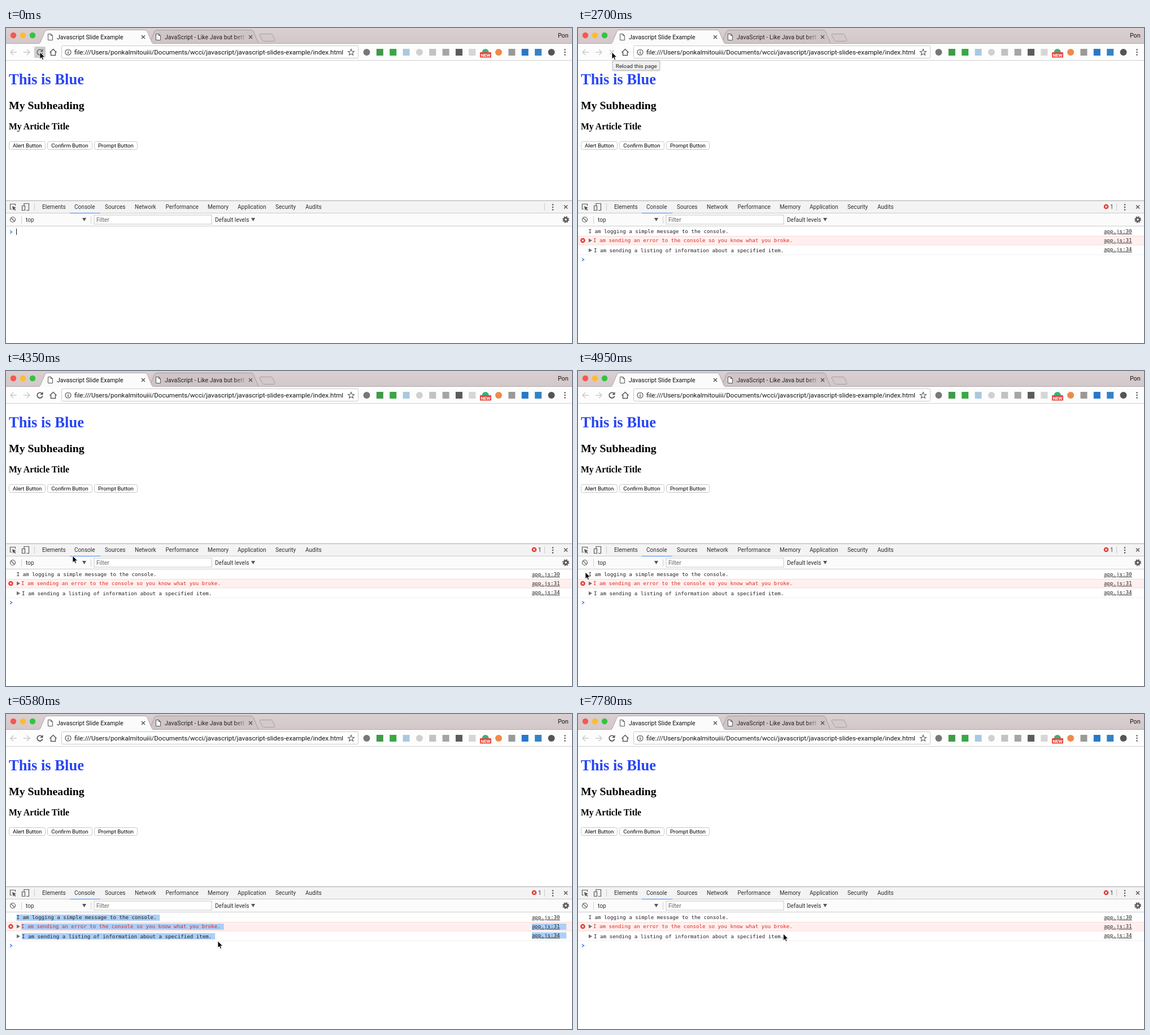
These frames come from a looping animation (1002 by 559 pixels, 8000 ms). An HTML page:

```html
<!DOCTYPE html>
<html lang="en">
<head>
<meta charset="utf-8">
<title>Browser console demo</title>
<style>
  html, body { margin: 0; width: 100%; height: 100%; overflow: hidden; background: #fff; }
  svg { display: block; width: 1002px; height: 559px; font: 10.1px Roboto, sans-serif; fill: #303030; }
  text { white-space: pre; }
  .line { fill: none; stroke: #5a5a5a; stroke-width: 1.5; }
  .rule { stroke: #ccc; }
  .page { font-family: "Liberation Serif", serif; font-weight: bold; fill: #000; }
  .box { fill: #fff; stroke: #c8c8c8; }
  .tab { font-size: 10.6px; fill: #111; }
  .mono { font: 9.17px "DejaVu Sans Mono", monospace; fill: #222; }
  .link { text-decoration: underline; }
  .small { font-size: 9.7px; fill: #000; }
  .tip rect { fill: #f1f1f1; stroke: #c3c3c3; filter: drop-shadow(0 1px 1px #0004); }
  .tip text { font-size: 9.9px; fill: #222; }
</style>
</head>
<body>
<svg viewBox="0 0 1002 559">
  <defs>
    <linearGradient id="strip" x2="0" y2="1"><stop stop-color="#dacfd1"/><stop offset="1" stop-color="#d2c7c9"/></linearGradient>
    <linearGradient id="fade" gradientUnits="userSpaceOnUse" x1="404" x2="428"><stop stop-color="#222"/><stop offset="1" stop-color="#222" stop-opacity="0"/></linearGradient>
    <path id="doc" d="M.5.5h5l3 3v8h-8zM5.5.5v3h3" fill="#fff" stroke="#555"/>
    <path id="close" d="M-3-3 3 3M3-3-3 3" class="line"/>
    <g id="reload"><path d="M3.5-3.3A4.8 4.8 0 1 0 4.7 1.2" fill="none" stroke-width="1.7"/><path d="M5.5-6v5.3H.2z" stroke="none"/></g>
    <path id="caret" d="M0 0h7l-3.5 6z" fill="#555"/>
    <path id="prompt" d="M-2-2.5 1.5 0-2 2.5" fill="none" stroke="#3b78e7" stroke-width="1.4"/>
    <g id="dots"><circle cy="-4.5" r="1.3"/><circle r="1.3"/><circle cy="4.5" r="1.3"/></g>
    <g id="error"><circle r="4.3" fill="#df3a32"/><path d="M-1.6-1.6 1.6 1.6M1.6-1.6-1.6 1.6" stroke="#fff" stroke-width="1.2"/></g>
  </defs>

  <!-- tab strip -->
  <rect width="1002" height="28" fill="url(#strip)"/>
  <path d="M254 27.5 263 6q1-2.5 4-2.5H434q3 0 4 2.5L447 27.5z" fill="#cfc5c7" stroke="#a79fa1"/>
  <path d="M451 10.5h18q2 0 3 2l4 9q0 2-2 2H457q-2 0-3-2l-5-9q0-2 2-2z" fill="#d3c9cb" stroke="#a79fa1"/>
  <path d="M0 27.5H1002" stroke="#b1a8aa"/>
  <path d="M57 28.5Q60 27.5 61 25L69 6q1-2.5 4-2.5H246q3 0 4 2.5L258 25q1 2.5 4 3.5z" fill="#fbfbfb" stroke="#b1a8aa"/>
  <circle cx="13" cy="13" r="5.2" fill="#f9564f"/><circle cx="30" cy="13" r="5.2" fill="#fdbc2e"/><circle cx="47" cy="13" r="5.2" fill="#31c541"/>
  <use href="#doc" x="74" y="10"/><use href="#doc" x="265" y="10"/>
  <text class="tab" x="90" y="19.5">Javascript Slide Example</text>
  <text class="tab" x="281" y="19.5" style="fill:url(#fade)">JavaScript - Like Java but bett</text>
  <use href="#close" x="243" y="16"/><use href="#close" x="433" y="16"/>
  <text class="tab" x="977" y="17">Pon</text>

  <!-- toolbar -->
  <rect y="28" width="1002" height="30" fill="#fdfdfd"/>
  <path d="M0 57.5H1002" stroke="#d0d0d0"/>
  <g class="line">
    <path d="M19 43H8m5-5-5 5 5 5M31 43H42m-5-5 5 5-5 5" stroke="#ccc"/>
    <path d="M77.5 43.5 83.5 37.5 89.5 43.5M79.5 42.5V48.5H87.5V42.5"/>
  </g>
  <rect data-at="0-2550" x="50" y="33" width="20" height="20" rx="2" fill="#cdcdcd"/>
  <use data-at="0-2550" href="#reload" x="60" y="43" fill="#707070" stroke="#707070"/>
  <path data-at="2550-3900" d="M56 39l8 8m0-8-8 8" stroke="#c8c8c8" stroke-width="1.7"/>
  <use data-at="3900-4200" href="#reload" x="60" y="43" fill="#c8c8c8" stroke="#c8c8c8"/>
  <use data-at="4200-8000" href="#reload" x="60" y="43" fill="#555" stroke="#555"/>
  <rect class="box" x="98.5" y="31.5" width="525" height="22" rx="2"/>
  <circle class="line" cx="110" cy="43" r="5" style="stroke-width:1.2"/>
  <path d="M110 42v4m0-6.5v1.5" class="line"/>
  <text x="121" y="46.8" style="font-size:11.55px;fill:#111">file:///Users/ponkalmitouiii/Documents/wcci/javascript/javascript-slides-example/index.html</text>
  <path d="M611 37.5l1.5 3.7 4 .3-3 2.6 1 3.9-3.5-2.1-3.5 2.1 1-3.9-3-2.6 4-.3z" class="line" style="stroke-width:1.1"/>
  <g id="extensions"></g>
  <rect x="839" y="43" width="20" height="9.5" rx="1" fill="#e5483c"/>
  <text x="849" y="51" text-anchor="middle" style="font-size:8px;font-weight:bold;fill:#fff">NEW</text>
  <use href="#dots" x="989.5" y="43" fill="#555"/>

  <!-- page -->
  <g class="page">
    <text x="5" y="100" style="font-size:26.6px;fill:#2845f5">This is Blue</text>
    <text x="5" y="143.5" style="font-size:19.8px">My Subheading</text>
    <text x="5" y="179.5" style="font-size:15.75px">My Article Title</text>
  </g>
  <g class="box">
    <rect x="5.5" y="201.5" width="64" height="14" rx="3"/>
    <rect x="73.5" y="201.5" width="79" height="14" rx="3"/>
    <rect x="156.5" y="201.5" width="76" height="14" rx="3"/>
  </g>
  <g class="small">
    <text x="12" y="211.7">Alert Button</text><text x="80.3" y="211.7">Confirm Button</text><text x="163" y="211.7">Prompt Button</text>
  </g>

  <!-- developer tools -->
  <rect y="306" width="1002" height="22" fill="#f3f3f3"/>
  <rect y="329" width="1002" height="22" fill="#fbfbfb"/>
  <path d="M0 306.5H1002" stroke="#a9a9a9"/>
  <path class="rule" d="M0 328.5H1002M0 351.5H1002M50.5 311v13M953.5 311v13M27.5 334v13M150.5 334v13"/>
  <rect x="113" y="328" width="54" height="1" fill="#4285f4"/>
  <g class="line" style="stroke-width:1.2">
    <path d="M10 321.5H7.5v-9h9v3"/>
    <path d="M32 315v-3.5h8.5v12H36M28.5 315.5h5v8h-5z"/>
    <circle cx="12" cy="340" r="4.5"/><path d="M9 337l6 6"/>
    <circle cx="991" cy="340" r="3.2" style="stroke-width:2.8"/>
    <circle cx="991" cy="340" r="5" style="stroke-width:2;stroke-dasharray:2 1.927"/>
  </g>
  <path d="M11 316l7 3-3 1.2 2.5 2.5-1.2 1.2-2.5-2.5-1.2 2.6z" fill="#555"/>
  <g id="panels"></g>
  <use href="#dots" x="968" y="318" fill="#555"/><use href="#close" x="991" y="317.5"/>
  <text x="35" y="343.5">top</text><use href="#caret" x="135" y="337"/>
  <rect class="box" x="156" y="332" width="208" height="16"/>
  <text x="160" y="343.5" fill="#666">Filter</text>
  <text x="370" y="343.5">Default levels</text><use href="#caret" x="434" y="337"/>

  <!-- console -->
  <use data-at="0-2700" href="#prompt" x="9" y="362"/>
  <path data-at="0-300 900-1500 1950-2550" d="M18.5 356v11" stroke="#111"/>
  <g data-at="2700-8000">
    <use href="#error" x="935" y="317"/><text x="942" y="321">1</text>
    <rect x="-1" y="369.5" width="1004" height="15.5" fill="#fff0ef" stroke="#fad9d7"/>
    <path d="M0 402.5H1002" stroke="#f0f0f0"/>
    <g id="selection" fill="#abcff8"></g>
    <use href="#error" x="8.5" y="377"/>
    <path d="M19 373.5v7l6-3.5zM19 391v7l6-3.5z" fill="#6e6e6e"/>
    <g id="log" class="mono"></g>
    <use href="#prompt" x="9" y="411"/>
  </g>

  <g class="tip" id="reloadTip" data-at="900-2850">
    <rect x="61.5" y="58.5" width="83" height="16"/><text x="66.8" y="70.5">Reload this page</text>
  </g>
  <g class="tip" data-at="2850-4200">
    <rect x="61.5" y="58.5" width="109" height="16"/><text x="66.8" y="70.5">Stop loading this page</text>
  </g>
  <path id="pointer" d="M0 0V12L2.8 9.4 4.6 13.6 6.6 12.8 4.8 8.7H8.6Z" fill="#000" stroke="#fff" stroke-width=".8"/>
</svg>
<script>
const LOOP = 8000, CHAR = 5.52;
const $ = id => document.getElementById(id);

const logs = [
  { x: 18.5, y: 364, top: 356, color: '#222', link: 'app.js:30', linkY: 364, text: 'I am logging a simple message to the console.' },
  { x: 27, y: 380.3, top: 372, color: '#dc2a22', link: 'app.js:31', linkY: 380.3, text: 'I am sending an error to the console so you know what you broke.' },
  { x: 28, y: 397.5, top: 389, color: '#222', link: 'app.js:34', linkY: 396, text: 'I am sending a listing of information about a specified item.' }
];
$('log').innerHTML = logs.map(l =>
  `<text x="${l.x}" y="${l.y}" style="fill:${l.color}">${l.text}</text>
   <text class="link" x="931" y="${l.linkY}">${l.link}</text>`).join('');

const panels = { Elements: 64, Console: 121, Sources: 175, Network: 228, Performance: 282.5,
  Memory: 357, Application: 410, Security: 477, Audits: 530 };
$('panels').innerHTML = Object.entries(panels).map(([name, x]) =>
  `<text x="${x}" y="321">${name}</text>`).join('');

// Extension buttons: round ones are marked with "o".
const extensions = ['o#777', '#3f9b46', '#39a845', '#a9c9df', 'o#d0d0d0', '#c2c2c2', '#a5a5a5', '#5c5c5c',
  '#d6d6d6', 'o#36b37e', 'o#ee8a4b', '#999', '#2878c8', '#3583c6', 'o#555'];
$('extensions').innerHTML = extensions.map((c, i) => {
  const round = c[0] === 'o';
  return `<rect x="${632.5 + i * 23.36}" y="37" width="12" height="12" rx="${round ? 6 : 0}" fill="${round ? c.slice(1) : c}"/>`;
}).join('');

// Pointer positions, each held until the next: time, x, y.
const path = [
  [0, 60, 43], [3900, 181, 286], [4050, 191, 294], [4200, 168, 306], [4350, 118, 328],
  [4500, 66, 345], [4650, 30, 354], [4800, 14, 357], [4950, 13, 357], [5240, 18, 359],
  [5390, 76, 371], [5530, 220, 385], [5680, 333, 397], [5830, 362, 402], [5980, 370, 405],
  [6130, 373, 405], [6280, 373, 404], [6580, 375, 403], [6880, 377, 403], [7030, 380, 401],
  [7180, 382, 399], [7330, 383, 398], [7780, 363.5, 390]
];

const timed = [...document.querySelectorAll('[data-at]')].map(el => ({
  el, spans: el.dataset.at.split(' ').map(s => s.split('-').map(Number))
}));

// Selects from the first log line to the pointer.
function selection(x, y) {
  const row = [369, 386, 403].filter(edge => y >= edge).length;
  return logs.slice(0, row + 1).map((l, i) => {
    const full = l.text.length + 1;
    const count = i < row ? full : Math.max(0, Math.min(full, Math.round((x - l.x - 5) / CHAR)));
    return `<rect x="${l.x}" y="${l.top}" width="${count * CHAR}" height="11"/>` +
      (i ? `<rect x="931" y="${l.top - (i > 1 ? 1.5 : 0)}" width="61" height="11"/>` : '');
  }).join('');
}

function draw(t) {
  for (const { el, spans } of timed)
    el.style.display = spans.some(([a, b]) => t >= a && t < b) ? '' : 'none';
  $('reloadTip').style.opacity = t < 1050 ? 0.6 : 1;
  const [, x, y] = path.findLast(p => p[0] <= t);
  $('pointer').setAttribute('transform', `translate(${x} ${y})`);
  $('selection').innerHTML = t >= 5240 && t < 6880 ? selection(x, y) : '';
}

const start = performance.now();
function tick() {
  draw((performance.now() - start) % LOOP);
  requestAnimationFrame(tick);
}
tick();
</script>
</body>
</html>
```
